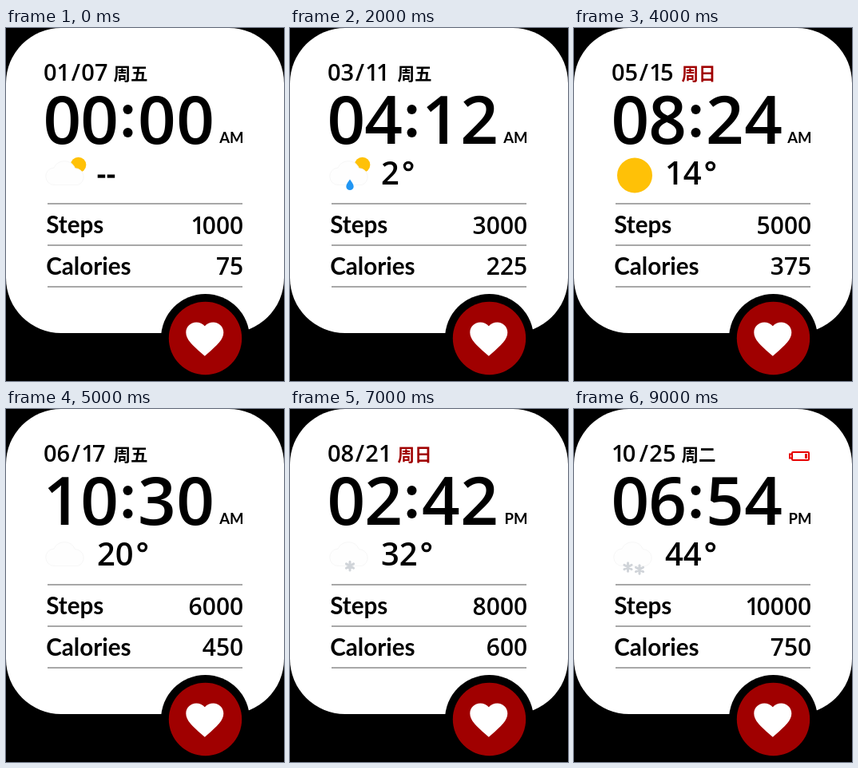
Animation of 348x442 px, one loop 10000 ms. Source, as an HTML page:

```html
<!DOCTYPE html>
<html lang="en">
<head>
<meta charset="utf-8">
<title>Watch face</title>
<style>
  html, body { margin: 0; width: 100%; height: 100%; overflow: hidden; background: #000; }
  svg { display: block; width: 348px; height: 442px; }
  text { font-family: Lato, "Open Sans", sans-serif; font-weight: 700; }
  .digit { font-family: "Open Sans", "Noto Sans", sans-serif; font-weight: 600; }
  .day { font: 700 21.5px "Noto Sans CJK SC", "Noto Sans CJK", sans-serif; }
</style>
</head>
<body>
<svg viewBox="0 0 348 442">
  <defs>
    <path id="drop" fill="#2196f3" d="M0-7C2-4 4.7-1 4.7 1.8A4.7 4.7 0 0 1-4.7 1.8C-4.7-1-2-4 0-7Z"/>
    <path id="flake" stroke="#d0d4d9" stroke-width="3" stroke-linecap="round"
      d="M0-5.3V5.3M-4.6-2.7L4.6 2.7M-4.6 2.7L4.6-2.7"/>
    <path id="cloud" fill="#fefefe" stroke="#f7f7f7"
      d="M61 196.5A10.7 10.7 0 0 1 60 175A14.5 14.5 0 0 1 86.5 175.7A10.7 10.7 0 0 1 90 196.5Z"/>
    <circle id="smallSun" cx="90.6" cy="171.4" r="9.7" fill="#ffc107"/>
  </defs>
  <rect width="348" height="382" rx="69" fill="#fff"/>
  <circle cx="249.5" cy="388.5" r="55.5"/>
  <circle cx="249.5" cy="388.5" r="45.7" fill="#a00000"/>
  <path fill="#fff" transform="translate(220.6 361.6) scale(2.35 2.3)"
    d="M12 21.35L10.55 20.03C5.4 15.36 2 12.28 2 8.5C2 5.42 4.42 3 7.5 3C9.24 3 10.91 3.81 12 5.09C13.09 3.81 14.76 3 16.5 3C19.58 3 22 5.42 22 8.5C22 12.28 18.6 15.36 13.45 20.04Z"/>
  <path stroke="#a8a8a8" stroke-width="2" d="M52 220H296M52 272H296M52 324H296"/>
  <text x="50.2" y="256.8" font-size="29.6">Steps</text>
  <text x="50.2" y="308.8" font-size="29.6">Calories</text>
  <circle cx="152.5" cy="102" r="6"/>
  <circle cx="152.5" cy="131" r="6"/>
  <g id="live"></g>
</svg>
<script>
const live = document.getElementById('live');
const weekdays = '日一二三四五六';
const pad = n => String(n).padStart(2, '0');
const use = (id, x = 0, y = 0) => `<use href="#${id}" x="${x}" y="${y}"/>`;

const glyph = (c, x, y, size) =>
  `<text class="digit" x="${x}" y="${y}" font-size="${size}">${c}</text>`;

// Proportional digits: the 1 is narrower than the rest.
const advance = (c, size) => size * (c === '1' ? 0.47 : 0.572);
function digits(value, x, y, size) {
  return [...String(value)].map(c => {
    const out = glyph(c, x, y, size);
    x += advance(c, size);
    return out;
  }).join('');
}
function digitsRight(value, x, y, size) {
  const width = [...String(value)].reduce((sum, c) => sum + advance(c, size), 0);
  return digits(value, x - width, y, size);
}

function clock(hours, minutes) {
  const slots = [46.5, 93.3, 165, 213.3];
  return [...pad(hours % 12) + pad(minutes)]
    .map((c, i) => glyph(c, slots[i], 144.7, 83.5)).join('') +
    `<text x="297.5" y="144" font-size="18.5" text-anchor="end">${hours < 12 ? 'AM' : 'PM'}</text>`;
}

function temperature(degrees) {
  const dash = x => `<rect x="${x}" y="183.5" width="9.5" height="4.2"/>`;
  if (degrees < -9) return dash(114.7) + dash(126.7);
  let x = degrees < 0 ? 126 : 114;
  let out = degrees < 0 ? dash(114.7) : '';
  for (const c of String(Math.abs(degrees))) {
    out += glyph(c, x, 196, 40);
    x += 22.7;
  }
  return out + `<circle cx="${x + 11.4}" cy="173" r="4.7" fill="none" stroke="#000" stroke-width="3.3"/>`;
}

const sunny = '<circle cx="76" cy="184.5" r="22" fill="#ffc107"/>';
const cloud = use('cloud');
const partly = use('smallSun') + cloud;
const single = id => use(id, 75, 196.6);
const pair = id => use(id, 67.5, 198) + use(id, 82, 201);
const weather = [
  partly, partly + single('drop'), partly + single('flake'), sunny, cloud,
  cloud + single('drop'), cloud + single('flake'), cloud + pair('drop'), cloud + pair('flake')
];

const lowBattery = '<g fill="none" stroke="#e60000" stroke-width="2">' +
  '<rect x="273" y="54" width="21" height="10" rx="1"/><path d="M273 56.5H270V61.5H273"/></g>' +
  '<rect x="289" y="56" width="3" height="6" fill="#e60000"/>';

function render(step) {
  const month = step + 1, date = 7 + 2 * step;
  const weekday = new Date(2022, step, date).getDay();
  live.innerHTML =
    digits(pad(month), 47, 66.3, 29) +
    glyph('/', 81.8, 66.3, 29) +
    digits(pad(date), 94.3, 66.3, 29) +
    `<text class="day" x="134.5" y="65.3"${weekday ? '' : ' fill="#a00000"'}>周${weekdays[weekday]}</text>` +
    clock(step * 2, step * 6) +
    weather[Math.max(0, step - 1)] +
    temperature(step * 6 - 10) +
    digitsRight(month * 1000, 297.2, 257.5, 30) +
    digitsRight(month * 75, 297.2, 308.5, 30) +
    (step === 9 ? lowBattery : '');
}

let shown = -1;
const start = performance.now();
function tick() {
  const step = Math.floor((performance.now() - start) / 1000) % 10;
  if (step !== shown) render(shown = step);
  requestAnimationFrame(tick);
}
tick();
</script>
</body>
</html>
```
